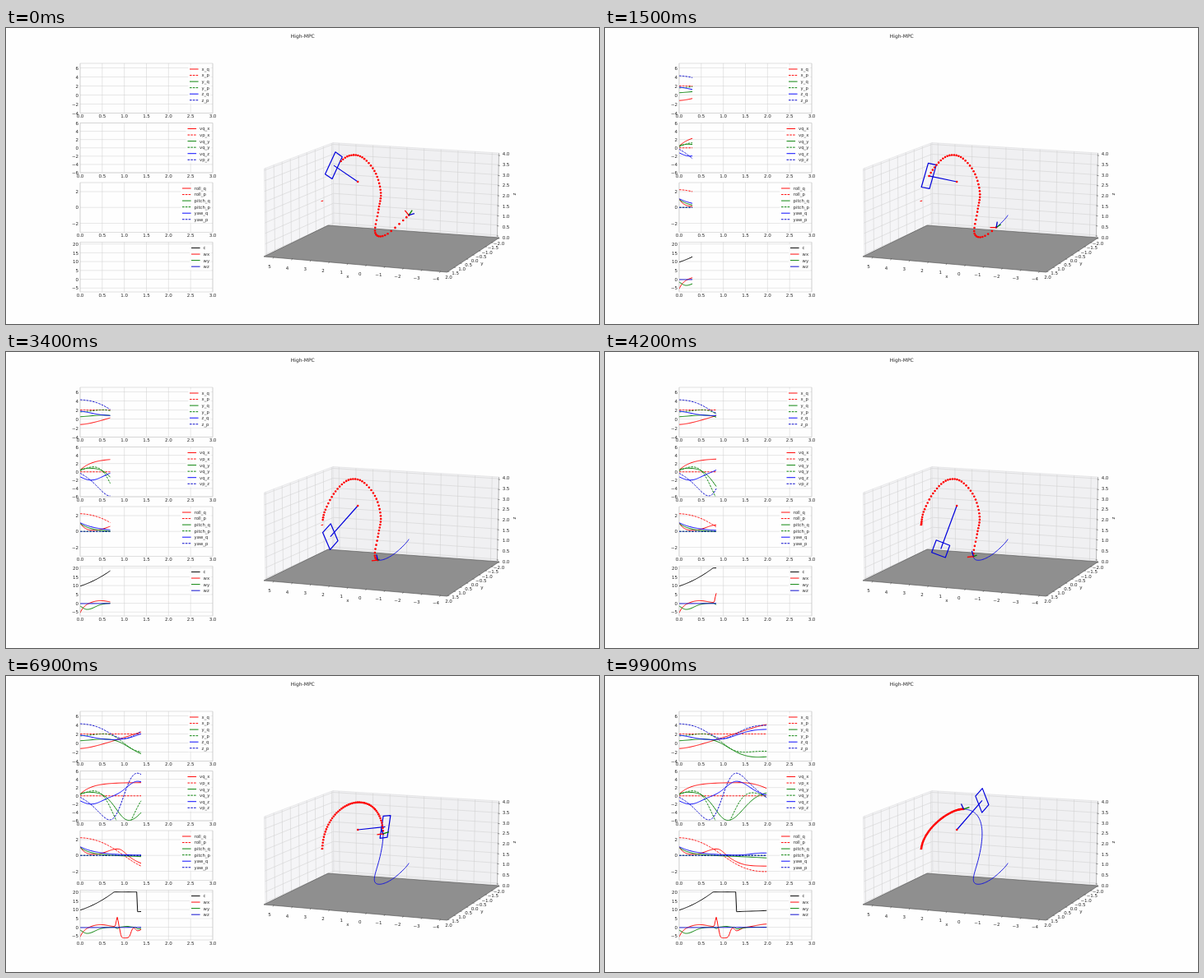
Write an HTML page with a canvas that moves like this. It is 720 by 360 pixels and loops after 10 s.

```html
<!DOCTYPE html>
<html lang="en">
<head>
<meta charset="utf-8">
<title>High-MPC</title>
<style>
html, body { margin: 0; width: 100%; height: 100%; overflow: hidden; background: #fefefe; }
canvas { display: block; width: 720px; height: 360px; }
</style>
</head>
<body>
<canvas id="stage"></canvas>
<script>
const canvas = document.getElementById('stage');
const ctx = canvas.getContext('2d');
const dpr = window.devicePixelRatio || 1;
canvas.width = 720 * dpr;
canvas.height = 360 * dpr;

const RED = '#ff0000', GREEN = '#008000', BLUE = '#0000ff', NAVY = '#0000cc', INK = '#262626';
const GRID = '#cfcfcf';
const FONT = '"DejaVu Sans", sans-serif';
const DT = 0.02, STEPS = 100, SUB = 20;

const { exp, sin, cos, min, max, PI } = Math;
const range = (n, f) => Array.from({ length: n }, (_, i) => f(i));
const bump = (t, mid, left, right = left) => exp(-(((t - mid) / (t < mid ? left : right)) ** 2));
const rise = (t, mid, width) => 1 / (1 + exp((mid - t) / width));
const ease = (t, from, to) => {
  const s = min(1, max(0, (t - from) / (to - from)));
  return s * s * (3 - 2 * s);
};
const mix = (a, b, s) => [a[0] + (b[0] - a[0]) * s, a[1] + (b[1] - a[1]) * s];

// Vehicle velocity
const vx = t => 0.4 + 2.8 * (1 - exp(-t / 0.27)) - 1.4 * (max(0, t - 1.4) / 0.58) ** 2;
const vy = t => 1 - 0.5 * exp(-t / 0.12) - 6.9 * bump(t, 1.1, 0.4, 0.5);
const vz = t => 3.5 * bump(t, 1.3, 0.34, 0.415) - 2 * bump(t, 0.25, 0.35);

// Integrate the vehicle and the swinging gate, a damped pendulum
const PIVOT = [2, 0, 3], ROD = 2.02;
const states = [];
{
  const h = DT / SUB;
  let x = -1.22, y = 0.5, z = 1.75, roll = 2.24, spin = -0.2;
  for (let i = 0; i <= (STEPS + 1) * SUB; i++) {
    if (i % SUB === 0) states.push({ x, y, z, roll, spin });
    const t = i * h;
    x += h * vx(t);
    y += h * vy(t);
    z += h * vz(t);
    spin -= h * (4.95 * sin(roll) + 0.07 * spin);
    roll += h * spin;
  }
}
const at = t => states[Math.round(t / DT)];

// Perspective view of the world box
function project(x, y, z) {
  const u = (5.53 - x) / 9.9, v = (2.083 - y) / 4.167, w = (z + 0.083) / 4.167;
  const k = 1 - 0.055 * u + 0.089 * v - 0.012 * w;
  return [(313 + 192.6 * u + 112.8 * v - 5.5 * w) / k,
          (278 + 2.67 * u - 16.6 * v - 109 * w) / k];
}
const vehicle = t => project(at(t).x, at(t).y, at(t).z);

// Planned course: a loop on the stage that ends at the goal
const GOAL = [384, 210];
const course = [[488, 227], [461, 251], [448, 249], [452, 222], [455, 200], [448, 175],
                [432, 157], [415, 156], [399, 171], [387, 194], GOAL];

function along(a) {
  const i = min(course.length - 2, Math.floor(a)), s = a - i;
  const p = j => course[min(course.length - 1, max(0, j))];
  const axis = k => {
    const [b, c, d, e] = [p(i - 1)[k], p(i)[k], p(i + 1)[k], p(i + 2)[k]];
    return c + s / 2 * (d - b + s * (2 * b - 5 * c + 4 * d - e + s * (3 * (c - d) + e - b)));
  };
  return [axis(0), axis(1)];
}
function nearest(q) {
  const gap = a => Math.hypot(along(a)[0] - q[0], along(a)[1] - q[1]);
  return range(141, i => i / 20).reduce((best, a) => gap(a) < gap(best) ? a : best);
}
function bezier(a, b, c, d, s) {
  return mix(mix(mix(a, b, s), mix(b, c, s), s), mix(mix(b, c, s), mix(c, d, s), s), s);
}
// Early plans follow the loop, late ones fall freely to the goal.
function plan(t, count) {
  const q = vehicle(t), next = vehicle(t + DT), left = 3 - t;
  const from = nearest(q), to = min(10, 7.5 + 3 * t), base = along(from);
  const ahead = mix(q, next, left / 3 / DT);
  const above = [GOAL[0] + 3, GOAL[1] - 24 * left * left];
  const fall = ease(t, 0.84, 1.45);
  return range(count, i => {
    const s = i / (count - 1), pull = (1 - s) ** 4;
    const p = along(from + (to - from) * s);
    const loop = [p[0] + (q[0] - base[0]) * pull, p[1] + (q[1] - base[1]) * pull];
    return mix(loop, bezier(q, ahead, above, GOAL, s), fall);
  });
}

// Charted signals
const zero = () => 0;
const rollQ = t => 1.1 * exp(-t / 0.11) + 0.88 * bump(t, 0.87, 0.35, 0.2) - 1.35 * rise(t, 1.25, 0.13);
const pitchQ = t => exp(-t / 0.25) - 0.08 * t * t;
const yawQ = t => 1.1 * exp(-t / 0.4) + 0.3 * ease(t, 1.3, 1.9);
const thrust = t => t < 1.29 ? min(20, 9.7 + 8 * t + 7 * t * t) : 8.8 + 0.9 * (t - 1.29);
const wx = t => -5.6 * exp(-t / 0.1) + 1.5 * bump(t, 0.45, 0.28) + 5.5 * bump(t, 0.84, 0.03)
  - 6.1 * (rise(t, 0.91, 0.012) - rise(t, 1.15, 0.02)) - 2 * bump(t, 1.3, 0.06, 0.12) + 1.8 * ease(t, 1.45, 2);
const wy = t => -3.5 * bump(t, 0.16, 0.18, 0.25) - 0.8 * bump(t, 0.84, 0.03)
  + 0.5 * bump(t, 1.05, 0.1) - 0.9 * bump(t, 1.3, 0.03, 0.18);
const wz = t => 0.1 * t - 0.2;

const solid = (name, color, fn) => ({ name, color, fn });
const dashed = (name, color, fn) => ({ name, color, fn, dash: [2.6, 1.2] });

const panels = [
  { lo: -4, hi: 7, first: -4, gap: 2, key: 223, lines: [
    solid('x_q', RED, t => at(t).x), dashed('x_p', RED, () => PIVOT[0]),
    solid('y_q', GREEN, t => at(t).y), dashed('y_p', GREEN, t => ROD * sin(at(t).roll)),
    solid('z_q', BLUE, t => at(t).z), dashed('z_p', NAVY, t => PIVOT[2] - ROD * cos(at(t).roll))
  ] },
  { lo: -6, hi: 6, first: -6, gap: 2, key: 220.5, lines: [
    solid('vq_x', RED, vx), dashed('vp_x', RED, zero),
    solid('vq_y', GREEN, vy), dashed('vq_y', GREEN, t => ROD * cos(at(t).roll) * at(t).spin),
    solid('vq_z', BLUE, vz), dashed('vp_z', NAVY, t => ROD * sin(at(t).roll) * at(t).spin)
  ] },
  { lo: -3.14, hi: 3.14, first: -2, gap: 2, key: 214, lines: [
    solid('roll_q', RED, rollQ), dashed('roll_p', RED, t => at(t).roll),
    solid('pitch_q', GREEN, pitchQ), dashed('pitch_p', GREEN, zero),
    solid('yaw_q', BLUE, yawQ), dashed('yaw_p', NAVY, zero)
  ] },
  { lo: -7.2, hi: 21, first: -5, gap: 5, key: 225, lines: [
    solid('c', '#000', thrust), solid('wx', RED, wx), solid('wy', GREEN, wy), solid('wz', NAVY, wz)
  ] }
];
panels.forEach((p, i) => p.top = 43 + 72.5 * i);

const LEFT = 90, WIDE = 161, TALL = 60.5;

function trace(pts, close) {
  ctx.beginPath();
  pts.forEach(p => ctx.lineTo(p[0], p[1]));
  if (close) ctx.closePath();
}
function stroke(pts, color, width, close) {
  trace(pts, close);
  ctx.strokeStyle = color;
  ctx.lineWidth = width;
  ctx.stroke();
}
function fill(pts, color) {
  trace(pts, true);
  ctx.fillStyle = color;
  ctx.fill();
}
function text(str, x, y, size, align = 'center') {
  ctx.font = size + 'px ' + FONT;
  ctx.textAlign = align;
  ctx.textBaseline = 'alphabetic';
  ctx.fillStyle = INK;
  ctx.fillText(str, x, y + size * 0.36);
}
function dot(p, r) {
  ctx.beginPath();
  ctx.arc(p[0], p[1], r, 0, 7);
  ctx.fillStyle = RED;
  ctx.fill();
}
const signed = v => String(v).replace('-', '\u2212');

function drawPanel(p, now) {
  const px = t => LEFT + t / 3 * WIDE;
  const py = v => p.top + (p.hi - v) / (p.hi - p.lo) * TALL;
  for (let i = 0; i <= 6; i++) {
    const x = px(i / 2);
    stroke([[x, p.top], [x, p.top + TALL]], GRID, 0.5);
    text((i / 2).toFixed(1), x, p.top + TALL + 3.8, 5.5);
  }
  for (let v = p.first; v <= p.hi; v += p.gap) {
    stroke([[LEFT, py(v)], [LEFT + WIDE, py(v)]], GRID, 0.5);
    text(signed(v), LEFT - 2, py(v) + 0.2, 5.5, 'right');
  }
  ctx.save();
  ctx.beginPath();
  ctx.rect(LEFT, p.top, WIDE, TALL);
  ctx.clip();
  for (const line of p.lines) {
    ctx.setLineDash(line.dash || []);
    if (now > 0) stroke(range(now + 1, i => [px(i * DT), py(line.fn(i * DT))]), line.color, 0.95);
  }
  ctx.restore();
  ctx.strokeStyle = '#cccccc';
  ctx.lineWidth = 0.6;
  ctx.strokeRect(LEFT, p.top, WIDE, TALL);

  const rows = p.top + 7;
  ctx.fillStyle = 'rgba(254,254,254,.8)';
  ctx.fillRect(p.key - 2, rows - 4.5, 251.5 - p.key, p.lines.length * 7.55 + 1.5);
  p.lines.forEach((line, i) => {
    const y = rows + i * 7.55;
    ctx.setLineDash(line.dash || []);
    stroke([[p.key, y], [p.key + 10.6, y]], line.color, 0.95);
    ctx.setLineDash([]);
    text(line.name, p.key + 14.6, y, 5.3, 'left');
  });
}

const sideWall = [[315, 277.5], [313.5, 171], [397, 139.5], [398, 239]];
const backWall = [[398, 239], [397, 139.5], [598.5, 152], [596.5, 254]];
const floor = [[313, 278], [391, 240], [599, 255], [535.5, 297]];

function drawWall([bl, tl, tr, br], color, columns) {
  fill([bl, tl, tr, br], color);
  for (const c of columns) stroke([mix(bl, br, c), mix(tl, tr, c)], GRID, 0.55);
  for (let i = 0; i <= 8; i++) {
    const s = (i / 2 + 0.083) / 4.167;
    stroke([mix(bl, tl, s), mix(br, tr, s)], GRID, 0.55);
  }
  stroke([bl, tl, tr, br], '#d6d6d8', 0.5, true);
}

function drawBox() {
  drawWall(sideWall, '#f5f5f7', range(9, i => (i / 2 + 0.083) / 4.167));
  drawWall(backWall, '#f0f0f2', range(10, i => (i + 0.35) / 9.75));
  fill(floor, '#8f8f8f');
  stroke(floor, '#4a4a4a', 0.6, true);
  stroke([backWall[2], backWall[3]], '#8a8a8a', 0.5);

  const tick = ([x, y]) => stroke([[x - 0.8, y], [x + 1.6, y + 0.3]], '#444', 0.5);
  for (let i = 0; i < 10; i++) {
    const s = i / 9;
    text(signed(5 - i), 320 + 202 * (0.95 * s + 0.05 * s * s), 290 + 15.5 * s, 5.5);
    const [x, y] = mix(floor[0], floor[3], (i + 0.53) / 9.9);
    stroke([[x + 0.4, y - 0.8], [x - 0.8, y + 1.5]], '#444', 0.5);
  }
  for (let i = 0; i < 9; i++) {
    const s = i / 8;
    text(signed((2 - i / 2).toFixed(1)), 537.5 + 61 * (1.08 * s - 0.08 * s * s), 303.5 - 41.3 * s, 5.5);
    text((i / 2).toFixed(1), 607, 254.8 - 101.3 * s, 5.5);
    tick(mix(floor[3], floor[2], (i / 2 + 0.083) / 4.167));
    tick(mix(backWall[3], backWall[2], (i / 2 + 0.05) / 4.167));
  }
  text('x', 415, 302, 5.5);
  text('y', 578, 286, 5.5);
  ctx.save();
  ctx.translate(616.8, 202);
  ctx.rotate(-PI / 2);
  text('z', 0, 0, 5.5);
  ctx.restore();
}

function drawGate(t) {
  const s = sin(at(t).roll), c = cos(at(t).roll);
  const spot = (r, w) => project(PIVOT[0], PIVOT[1] + r * s + w * c, PIVOT[2] - r * c + w * s);
  const near = ROD - 0.28, far = ROD + 0.28, half = 0.53;
  const hub = project(...PIVOT);
  stroke([hub, spot(ROD, 0)], '#0000dc', 1.2);
  stroke([spot(near, -half), spot(near, half), spot(far, half), spot(far, -half)], '#0000dc', 1.2, true);
  dot(hub, 1.3);
}

function drawFlight(now) {
  const t = now * DT, q = vehicle(t);
  stroke([[382.6, 210.6], [385.2, 210.1]], RED, 1);
  if (now > 0) stroke(range(now + 1, i => vehicle(i * DT)), '#1010e0', 0.95);
  plan(t, 50).forEach(p => dot(p, 1.3));

  // Body axes turn quickly to level, then hold
  const arm = (color, deg, len) => {
    const a = deg * PI / 180;
    stroke([q, [q[0] + len * cos(a), q[1] - len * sin(a)]], color, 1.3);
  };
  arm(RED, 187 - 57 * exp(-t / 0.13), 7.5);
  arm(GREEN, 18 + 38 * exp(-t / 0.3), 7.3 - 5 * bump(t, 0.65, 0.25));
  arm(NAVY, 105 + 5 * t - 89 * exp(-t / 0.25), 7);
}

function draw(now) {
  ctx.setTransform(dpr, 0, 0, dpr, 0, 0);
  ctx.setLineDash([]);
  ctx.lineJoin = 'round';
  ctx.fillStyle = '#fefefe';
  ctx.fillRect(0, 0, 720, 360);
  text('High-MPC', 360.3, 10, 6);
  panels.forEach(p => drawPanel(p, now));
  drawBox();
  drawGate(now * DT);
  drawFlight(now);
}

const start = performance.now();
let shown = -1;
function tick() {
  const now = Math.floor(max(0, performance.now() - start) / 100) % STEPS;
  if (now !== shown) draw(shown = now);
  requestAnimationFrame(tick);
}
tick();
</script>
</body>
</html>
```
